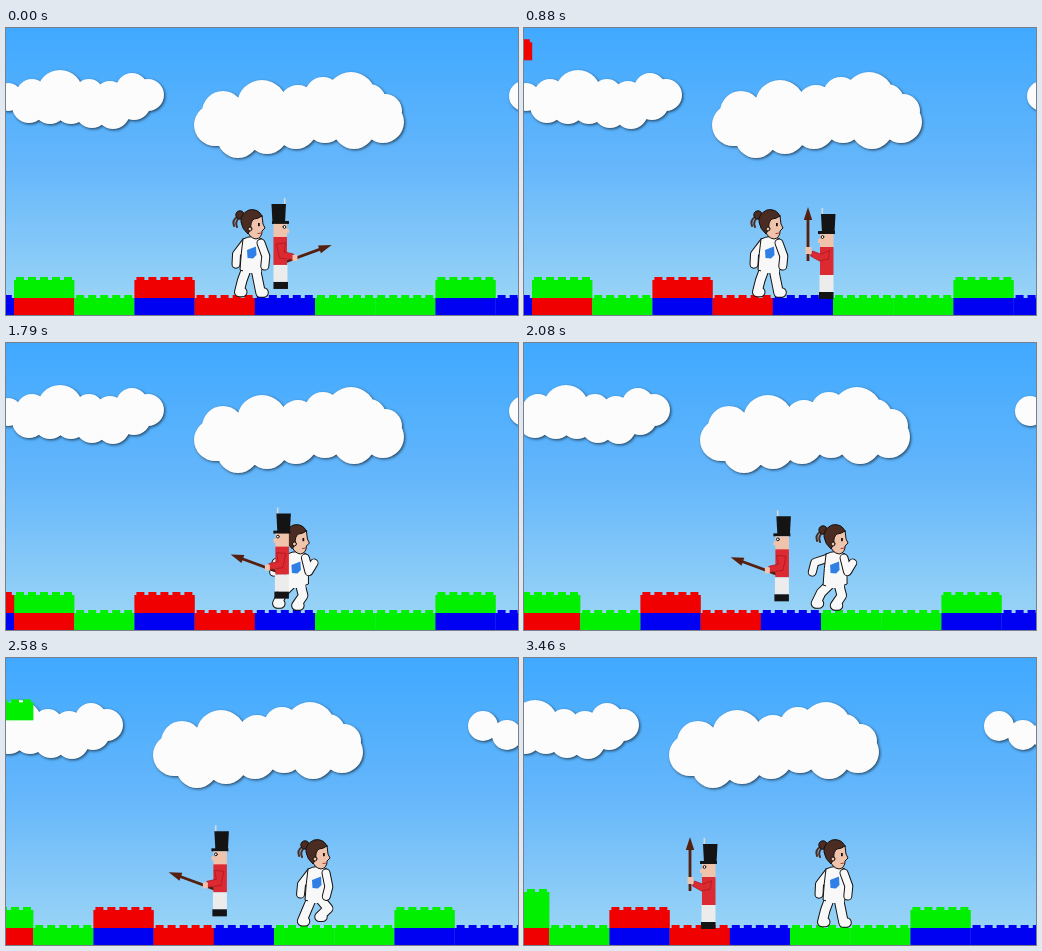
Animation of 512x287 px, one loop 3.5 s. Source, as an HTML page with a canvas:

```html
<!DOCTYPE html>
<html lang="en">
<head>
<meta charset="utf-8">
<title>Brick world</title>
<style>
  html, body { margin: 0; width: 100%; height: 100%; overflow: hidden; }
  canvas { display: block; width: 512px; height: 287px; }
</style>
</head>
<body>
<canvas id="stage" width="512" height="287"></canvas>
<script>
const ctx = document.getElementById('stage').getContext('2d');
const LOOP = 3500;
const RED = '#f00000', GREEN = '#00f000', BLUE = '#0000f2';
const INK = '#15110f', SUIT = '#f8f8f8', SKIN = '#f0c4ac', HAIR = '#4a2c22';
const WOOD = '#55200f', COAT = '#dc2a32';

const sky = ctx.createLinearGradient(0, 0, 0, 270);
sky.addColorStop(0, '#40a9ff');
sky.addColorStop(.5, '#64b6fb');
sky.addColorStop(1, '#98d3f6');

function box(color, x, y, w, h) {
  ctx.fillStyle = color;
  ctx.fillRect(x, y, w, h);
}

function shape(d, fill, stroke, width = 1) {
  const path = new Path2D(d);
  if (fill) { ctx.fillStyle = fill; ctx.fill(path); }
  if (stroke) { ctx.strokeStyle = stroke; ctx.lineWidth = width; ctx.stroke(path); }
}

function disc(x, y, r, fill) {
  ctx.beginPath();
  ctx.arc(x, y, r, 0, 7);
  ctx.fillStyle = fill;
  ctx.fill();
  ctx.strokeStyle = INK;
  ctx.lineWidth = 1;
  ctx.stroke();
}

// Upper puffs are [x, y, radius]; the underside is a row of equal puffs, given by their lowest points
function cloud(puffs, x, gap, r, undersides) {
  const row = undersides.map((bottom, i) => [x + gap * i, bottom - r, r]);
  ctx.save();
  ctx.shadowColor = 'rgba(0,0,0,.6)';
  ctx.shadowBlur = 3;
  ctx.shadowOffsetX = ctx.shadowOffsetY = 1.2;
  ctx.fillStyle = '#fcfcfc';
  ctx.beginPath();
  for (const [px, py, pr] of [...puffs, ...row]) {
    ctx.moveTo(px + pr, py);
    ctx.arc(px, py, pr, 0, 2 * Math.PI);
  }
  ctx.fill();
  ctx.restore();
}

function drawClouds() {
  cloud([[2, 69, 14], [26, 67, 16], [54, 65, 23], [83, 66, 15], [104, 69, 16], [126, 61, 16], [142, 67, 16]],
    23, 21, 17, [95, 96, 96, 100, 101, 92]);
  cloud([[209, 97, 21], [217, 84, 21], [256, 77, 25], [292, 76, 19], [317, 67, 18], [345, 69, 25], [363, 73, 17], [379, 83, 17]],
    232, 29, 21, [130, 126, 121, 115, 121, 115]);
  cloud([], 518, 24, 15, [83, 92, 92]);
}

function brick(color, column, y) {
  const x = 8 + column * 60.2;
  box(color, x, y, 60.4, 18);
  for (let i = 0; i < 5; i++) box(color, x + 2 + i * 12, y - 3, 8, 4);
}

function fallingBrick(color, column, t, start, floor) {
  if (t > start) brick(color, column, Math.min(floor, -82 + 1.716e-4 * (t - start) ** 2));
}

function drawBricks(t) {
  [BLUE, RED, GREEN, BLUE, RED, BLUE, GREEN, GREEN, BLUE, BLUE, BLUE]
    .forEach((color, i) => brick(color, i - 1, 270));
  brick(GREEN, 0, 252);
  brick(RED, 2, 252);
  brick(GREEN, 7, 252);
  fallingBrick(RED, -1, t, 132, 252);
  fallingBrick(GREEN, 0, t, 1723, 234);
}

function spear(x, y, angle) {
  ctx.save();
  ctx.translate(x, y);
  ctx.rotate(angle);
  box(WOOD, -1.4, -44, 2.8, 44);
  shape('M0 -54L4.2 -41H-4.2Z', WOOD);
  ctx.restore();
}

// The soldier hops 15px every 500ms and turns round once
function drawSoldier(t) {
  const right = t < 830;
  const cycle = right ? (t + 45) / 500 : Math.max(0, (t - 1020) / 500);
  const hops = Math.floor(cycle);
  const u = Math.min(1, (cycle - hops) / .7);
  const airborne = u > 0 && u < 1;
  const travel = 15 * (hops + u);

  ctx.save();
  ctx.translate(right ? 272.5 + travel : 302.5 - travel, 271 - 88 * u * (1 - u));
  if (right) ctx.scale(-1, 1);
  if (airborne) spear(-.5, -25.5, -1.22);
  else spear(-18.5, -38, 0);
  box('#d8d8d8', -5, -91, 1.6, 7);
  shape('M-5.5 -85H9L8 -66H-4.5Z', '#141414');
  box('#141414', -8.5, -68, 17, 3);
  box(SKIN, -6.5, -65, 13.5, 14);
  box(SKIN, -8.5, -60, 3, 4);
  disc(-4, -62, 1.4, '#fff');
  box(COAT, -6.5, -52, 13.5, 28);
  box('#ececec', -7, -24, 14, 17);
  box('#141414', -7.5, -7, 14.5, 7);
  if (airborne) {
    shape('M-5 -46L4 -45L1 -31L-13 -29V-35L-4 -37Z', COAT, '#a8141c', .7);
    box(SKIN, -17, -34, 5, 6);
  } else {
    shape('M3 -48L2 -40L-7 -38L-16 -43L-14 -48L-6 -45Z', COAT, '#a8141c', .7);
    box(SKIN, -21, -52, 6, 7);
  }
  ctx.restore();
}

// Limb angles [upper, lower] in radians: 0 hangs down, positive swings forward
const poses = {
  stand: { backArm: [-.65, -.05], frontArm: [.35, -.1], backLeg: [-.35, -.25], frontLeg: [.2, .2] },
  stride: { backArm: [-1.25, -.25], frontArm: [.25, 2.6], backLeg: [-.8, -.45], frontLeg: [.25, -.6] },
  pass: { backArm: [-.65, -.1], frontArm: [.2, -.25], backLeg: [-.4, -.4], frontLeg: [.7, -.8] }
};

function limb(x, y, [upper, lower], upperLength, lowerLength, width, foot = 0) {
  const path = new Path2D();
  path.moveTo(x, y);
  path.lineTo(x += upperLength * Math.sin(upper), y += upperLength * Math.cos(upper));
  path.lineTo(x += lowerLength * Math.sin(lower), y += lowerLength * Math.cos(lower));
  path.lineTo(x + foot, y);
  for (const [color, w] of [[INK, width], [SUIT, width - 2]]) {
    ctx.strokeStyle = color;
    ctx.lineWidth = w;
    ctx.stroke(path);
  }
}

const arm = (x, angles) => limb(x, 215, angles, 14, 10, 9);
const leg = (x, angles) => limb(x, 242, angles, 11, 12, 10.5, 3);

function drawHead() {
  shape('M231 189Q226 192 228 198M232 191Q229 195 231 199', null, HAIR, 2);
  disc(234, 187, 4.2, HAIR);
  shape('M241 188Q248 183 256 188L257 196L259 200L256 203Q256 210 250 211Q243 210 241 202Z', SKIN, INK);
  shape('M256 188Q252 180 243 182Q234 186 235 194Q236 201 242 206L245 200Q244 194 248 191Q252 191 256 188Z', HAIR, INK);
  disc(244, 201, 2, SKIN);
  box(INK, 252, 195, 1.8, 3.2);
  shape('M252 205.5L256 205', null, '#a8433c', 1.2);
}

function drawGirl(pose) {
  arm(239, pose.backArm);
  leg(240, pose.backLeg);
  leg(250, pose.frontLeg);
  shape('M237 211Q247 206 256 211Q259 226 258 241Q246 247 234 242Q235 225 237 211Z', SUIT, INK);
  ctx.fillStyle = SUIT;
  ctx.fillRect(237, 238, 18, 7);
  arm(255, pose.frontArm);
  shape('M241 222L250 218.5L250.5 227L247 230.5L241.5 230Z', '#2f7fe6');
  drawHead();
}

function render(t) {
  const run = Math.min(1, Math.max(0, (t - 1500) / 1250));
  const distance = 108 * (1 - (1 - run) ** 2);
  const scroll = Math.max(0, distance - 65);
  const moving = t > 1500 && t < 2680;
  const step = Math.floor((t - 1500) / 167);
  const pose = !moving ? 'stand' : step % 2 ? 'stride' : 'pass';

  box(sky, 0, 0, 512, 287);
  ctx.lineCap = ctx.lineJoin = 'round';
  ctx.save();
  ctx.translate(-Math.round(scroll), 0);
  drawClouds();
  drawBricks(t);
  ctx.save();
  ctx.translate(distance, 0);
  drawGirl(poses[pose]);
  ctx.restore();
  drawSoldier(t);
  ctx.restore();
}

function tick() {
  render(performance.now() % LOOP);
  requestAnimationFrame(tick);
}
tick();
</script>
</body>
</html>
```
